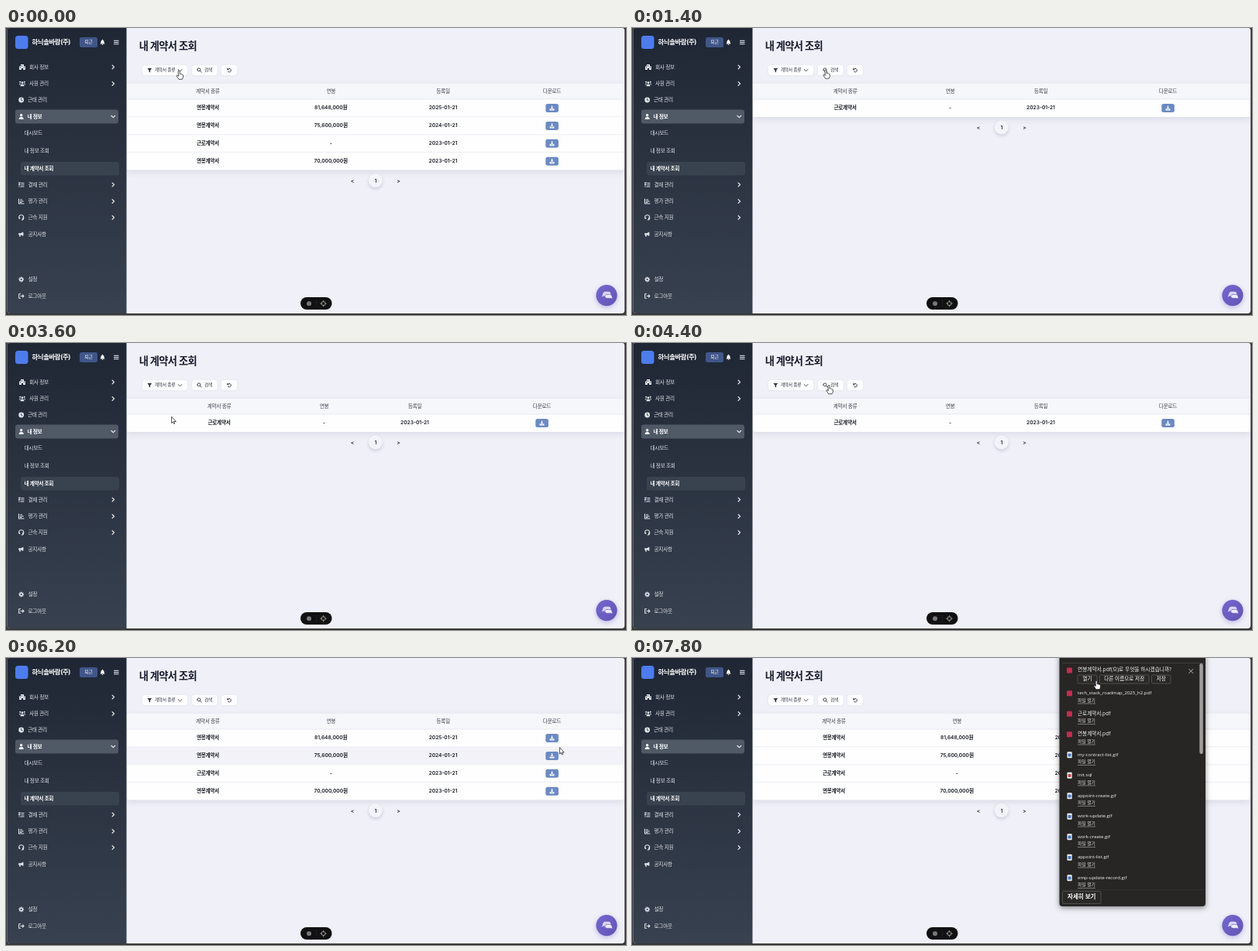
An HTML page with a canvas for the animation above (8 s loop, 800 px wide and 371 px high).

```html
<!DOCTYPE html>
<html lang="ko">
<head>
<meta charset="utf-8">
<title>내 계약서 조회</title>
<style>
html, body { margin: 0; width: 100%; height: 100%; overflow: hidden; background: #38383a; }
canvas { display: block; width: 800px; height: 371px; }
</style>
</head>
<body>
<canvas id="stage"></canvas>
<script>
const W = 800, H = 371, LOOP = 8000, STEP = 200;
const UI = "Inter, 'Noto Sans CJK KR', 'Noto Sans CJK', sans-serif";
const SYSTEM = "'Open Sans', 'Noto Sans CJK KR', 'Noto Sans CJK', sans-serif";
const canvas = document.getElementById('stage');
const dpr = window.devicePixelRatio || 1;
canvas.width = W * dpr;
canvas.height = H * dpr;
const ctx = canvas.getContext('2d');

function box(x, y, w, h, r, fill, stroke) {
  ctx.beginPath();
  ctx.roundRect(x, y, w, h, r);
  if (fill) { ctx.fillStyle = fill; ctx.fill(); }
  if (stroke) { ctx.strokeStyle = stroke; ctx.lineWidth = 0.7; ctx.stroke(); }
}

function disc(x, y, r, fill) {
  ctx.beginPath();
  ctx.arc(x, y, r, 0, Math.PI * 2);
  ctx.fillStyle = fill;
  ctx.fill();
}

function shadowed(blur, dy, color, draw) {
  ctx.save();
  ctx.shadowBlur = blur * dpr;
  ctx.shadowOffsetY = dy * dpr;
  ctx.shadowColor = color;
  draw();
  ctx.restore();
}

function text(s, x, y, { size = 6.7, weight = 500, color = '#222633', align = 'left', family = UI } = {}) {
  const tight = family === UI && /^[가-힣]/.test(s);
  ctx.font = `${weight} ${size}px ${family}`;
  ctx.letterSpacing = tight ? `${-0.045 * size}px` : '0px';
  ctx.textAlign = align;
  ctx.textBaseline = 'middle';
  ctx.fillStyle = color;
  ctx.fillText(s, x, y);
}

// Icons are centred on the given point.
function icon(d, x, y, { fill, stroke, width = 1, rule = 'evenodd' } = {}) {
  const path = new Path2D(d);
  ctx.save();
  ctx.translate(x, y);
  ctx.lineCap = ctx.lineJoin = 'round';
  if (fill) { ctx.fillStyle = fill; ctx.fill(path, rule); }
  if (stroke) { ctx.strokeStyle = stroke; ctx.lineWidth = width; ctx.stroke(path); }
  ctx.restore();
}

const ICON = {
  office: 'M-4-1H-2V-3.5H2V-1H4V3.5H1V1.5H-1V3.5H-4ZM-1-2.2V-1H0V-2.2ZM-3 .2V1.2H-2V.2ZM2 .2V1.2H3V.2Z',
  people: 'M-1.4-1.3a1.4 1.4 0 1 0 2.8 0a1.4 1.4 0 1 0-2.8 0ZM-3.8-2.3a1 1 0 1 0 2 0a1 1 0 1 0-2 0ZM1.8-2.3a1 1 0 1 0 2 0a1 1 0 1 0-2 0ZM-2.5 3.2Q-2.5 .6 0 .6T2.5 3.2ZM-4.2 1.2Q-4-.7-2-.6L-2.8 1.2ZM4.2 1.2Q4-.7 2-.6L2.8 1.2Z',
  clock: 'M-3.4 0a3.4 3.4 0 1 0 6.8 0a3.4 3.4 0 1 0-6.8 0ZM-.4-2.2H.4V-.2L1.7 .8L1.2 1.5L-.4 .3Z',
  person: 'M-1.7-1.8a1.7 1.7 0 1 0 3.4 0a1.7 1.7 0 1 0-3.4 0ZM-3 3.5Q-3 .5 0 .5T3 3.5Z',
  checks: 'M-3.3-2.3l.7.7l1.1-1.3M-3.3 0l.7.7l1.1-1.3M.2-2H3.3M.2.2H3.3M-3 2.5H-2.6M-.9 2.5H3.3',
  chart: 'M-3.2-3V3H3.3M-1.3-2H1M-1.3 0H2.6M-1.3 1.5H.2',
  headset: 'M-3 1V-.3a3 3 0 0 1 6 0V1M-2 .2V1.5M2 .2V1.5M3 1Q3 3 .5 3',
  horn: 'M-3.5-1.2H-.5L2.6-3V2.6L-.5 1H-1.2L-.7 3.3H-2.2L-2.7 1H-3.5ZM3-.9Q4-.2 3 .6Z',
  exit: 'M-1-2.7H-3V2.7H-1M-.8 0H3.2M1.6-1.7L3.3 0L1.6 1.7',
  bell: 'M-3 2Q-2 1-2-.8Q-2-2.8-.4-3.1V-3.8H.4V-3.1Q2-2.8 2-.8Q2 1 3 2ZM-.9 2.5H.9Q.6 3.6 0 3.6T-.9 2.5Z',
  menu: 'M-2.8-2.2H2.8M-2.8 0H2.8M-2.8 2.2H2.8',
  right: 'M-1.2-2.4L1.2 0L-1.2 2.4',
  down: 'M-2.4-1.2L0 1.2L2.4-1.2',
  funnel: 'M-2.9-2.6H2.9L.8 0V2.7L-.8 1.7V0Z',
  lens: 'M-2.6-.6a2 2 0 1 0 4 0a2 2 0 1 0-4 0M.9 1L2.7 2.8',
  reset: 'M-2.3-2.4V-.8H-.7M-2.1-.9A2.3 2.3 0 1 1-1.5 1.7',
  save: 'M-.6-3.1H.6V-.6H1.9L0 1.2L-1.9-.6H-.6ZM-3 1H-1.2L0 2L1.2 1H3V3H-3Z',
  aim: 'M-2.7 0a2.7 2.7 0 1 0 5.4 0a2.7 2.7 0 1 0-5.4 0M0-3.8V-1.8M0 3.8V1.8M-3.8 0H-1.8M3.8 0H1.8',
  close: 'M-2.7-2.7L2.7 2.7M2.7-2.7L-2.7 2.7',
  hand: 'M-1 0Q0-1 1 0V4Q2 3.4 2.6 4.2Q3.6 3.8 4 4.8Q5 4.5 5.2 5.6V8Q5 9.6 4 10.8H-.4Q-1.6 8.8-3 7Q-3.4 5.6-2.2 5.6L-1 6.6Z',
  arrow: 'M0 0V8L1.8 6.4L3 9L4.2 8.5L3 6H5.4Z'
};

const gear = Array.from({ length: 32 }, (_, i) => {
  const r = i % 4 < 2 ? 3.5 : 2.5, a = i * Math.PI / 16;
  return `${i ? 'L' : 'M'}${(r * Math.cos(a)).toFixed(2)} ${(r * Math.sin(a)).toFixed(2)}`;
}).join('') + 'ZM-1.1 0a1.1 1.1 0 1 0 2.2 0a1.1 1.1 0 1 0-2.2 0Z';

// label, y, text x, icon, line icon, chevron
const MENU = [
  ['회사 정보', 50.5, 30, ICON.office, false, 'right'],
  ['사원 관리', 72, 30, ICON.people, false, 'right'],
  ['근태 관리', 93, 28, ICON.clock],
  ['내 정보', 114.5, 27.5, ICON.person, false, 'down'],
  ['대시보드', 135.5, 23.5],
  ['내 정보 조회', 158.5, 23.5],
  ['내 계약서 조회', 181.5, 23.5],
  ['결재 관리', 202.5, 28.5, ICON.checks, true, 'right'],
  ['평가 관리', 224, 28.5, ICON.chart, true, 'right'],
  ['근속 지원', 245, 28.5, ICON.headset, true, 'right'],
  ['공지사항', 266.5, 28.5, ICON.horn],
  ['설정', 325, 28.5, gear],
  ['로그아웃', 346.5, 28.5, ICON.exit, true]
];

function drawSidebar() {
  const shade = ctx.createLinearGradient(0, 0, 0, 369);
  shade.addColorStop(0, '#1f2735');
  shade.addColorStop(1, '#38414f');
  box(1.5, 0, 154, 369, [3, 0, 0, 4], shade);
  box(12, 10, 16.5, 17, 3.5, '#4d7cec');
  text('하늬솔바람(주)', 33.5, 18.5, { size: 8.4, weight: 700, color: '#fff' });
  box(95, 12, 23, 13, 2.5, '#40568a');
  text('퇴근', 106.5, 18.5, { size: 6, color: '#eef1f8', align: 'center' });
  icon(ICON.bell, 124.5, 18.5, { fill: '#fff' });
  icon(ICON.menu, 142.3, 18.5, { stroke: '#f0f2f6' });

  box(12, 105.5, 133, 18, 3, '#505966');
  box(19, 173, 127, 17.5, 3, '#39424f');
  for (const [label, y, x, glyph, line, chevron] of MENU) {
    const strong = y === 114.5 || y === 181.5;
    const color = strong ? '#fff' : '#dfe3e9';
    if (glyph) icon(glyph, y < 80 ? 21 : 19.7, y, line ? { stroke: color, width: 1.1 } : { fill: color });
    text(label, x, y, { color, weight: strong ? 700 : 500 });
    if (chevron) icon(ICON[chevron], 138.3, y, { stroke: '#f0f2f5', width: 1.2 });
  }
}

function drawFilters() {
  const ink = '#33363f';
  shadowed(3, 0.5, 'rgba(60,60,100,.08)', () => {
    for (const [x, w] of [[176, 58], [240, 32.5], [278, 20]]) box(x, 48, w, 13, 3.5, '#fdfdff');
  });
  icon(ICON.funnel, 185.3, 54.7, { fill: ink });
  text('계약서 종류', 191.7, 54.6, { size: 5.8, color: ink });
  icon(ICON.down, 224.5, 54.7, { stroke: ink, width: 0.9 });
  icon(ICON.lens, 249.5, 54.5, { stroke: ink, width: 0.9 });
  text('검색', 256, 54.6, { size: 5.8, color: ink });
  icon(ICON.reset, 288, 54.7, { stroke: ink, width: 0.9 });
}

const HEADS = ['계약서 종류', '연봉', '등록일', '다운로드'];
const SALARY = '연봉계약서', LABOR = '근로계약서';
const CONTRACTS = [
  [SALARY, '81,648,000원', '2025-01-21'],
  [SALARY, '75,600,000원', '2024-01-21'],
  [LABOR, '-', '2023-01-21'],
  [SALARY, '70,000,000원', '2023-01-21']
];
const TOP = 92, ROW = 22.9;

function drawTable(rows, hover) {
  const cols = rows.length === 1 ? [275, 410.5, 527.5, 691.5] : [260.3, 419.3, 564, 704.5];
  const bottom = TOP + rows.length * ROW;
  shadowed(9, 3, 'rgba(70,70,110,.13)', () => box(155.5, 72, 642.5, bottom - 72, [0, 0, 3, 3], '#fefeff'));
  box(155.5, 72, 642.5, 20, 0, '#f6f7fb');
  HEADS.forEach((s, i) => text(s, cols[i], 82, { color: '#3c404b', align: 'center' }));
  rows.forEach((row, i) => {
    const y = TOP + i * ROW, mid = y + 11.5;
    if (i === hover) box(155.5, y, 642.5, ROW, 0, '#f2f2f8');
    box(155.5, y - 0.4, 642.5, 0.8, 0, '#e7e9f0');
    row.forEach((s, c) => text(s, cols[c], mid, { size: 6.6, weight: 600, color: '#171a22', align: 'center' }));
    box(cols[3] - 8.2, mid - 5.5, 16.6, 11, 2.5, '#6c8ac2');
    icon(ICON.save, cols[3], mid, { fill: '#fff' });
  });

  const y = bottom + 14;
  shadowed(4, 2, 'rgba(50,50,90,.2)', () => disc(476.8, y - 0.5, 9, '#f3f3fa'));
  [['<', 447], ['1', 476.8], ['>', 506.5]].forEach(([s, x]) =>
    text(s, x, y, { weight: 600, color: '#20242e', align: 'center' }));
}

function drawOverlays() {
  box(380, 348, 40.5, 16, 8, '#111113');
  disc(391, 356.3, 3, '#77787a');
  box(400, 352, 0.6, 8, 0, '#2b2b2d');
  icon(ICON.aim, 409.5, 356.2, { stroke: '#a5a59a', width: 0.8 });

  const violet = ctx.createLinearGradient(762, 333, 788, 359);
  violet.addColorStop(0, '#7267cf');
  violet.addColorStop(1, '#6553b4');
  shadowed(6, 2, 'rgba(90,75,180,.35)', () => disc(775, 345.6, 13.6, violet));
  icon('M-1.8-4.2H2.2Q5.2-4 5.2-1Q5 1.7 2 1.8L-4.5 1.6L-6.7 3L-5.6.4Q-5-4-1.8-4.2Z', 775.2, 345, { fill: '#d9d3f3' });
  icon('M0-1H4Q7-.4 6.8 2L7.4 4.5L4.8 3.8H0Q-2.6 3.3-2.5 1.4Q-2-.7 0-1Z', 775.2, 345.5, { fill: '#efecfb', stroke: '#6f61c4', width: 0.6 });
}

const PDF = '#c92a50', IMAGE = '#3e74c6', SQL = '#c9463f';
const FILES = [
  ['tech_stack_roadmap_2025_h2.pdf', PDF], ['근로계약서.pdf', PDF], ['연봉계약서.pdf', PDF],
  ['my-contract-list.gif', IMAGE], ['init.sql', SQL], ['appoint-create.gif', IMAGE],
  ['work-update.gif', IMAGE], ['work-create.gif', IMAGE], ['appoint-list.gif', IMAGE],
  ['emp-update-record.gif', IMAGE]
];

function fileMark(y, color) {
  if (color === PDF) return box(561, y - 3.5, 7, 7, 1, color);
  box(561.5, y - 4, 6.2, 8, 0.8, '#eef0f3');
  box(562.7, y - 1.8, 3.8, 4, 0.4, color);
}

function popupButton(label, x, y, w, h, style) {
  box(x, y, w, h, 1.5, '#292827', '#61605e');
  text(label, x + w / 2, y + h / 2, { color: '#fff', align: 'center', family: SYSTEM, ...style });
}

function drawPopup(full) {
  const bottom = full ? 321 : 48.5;
  shadowed(7, 2, 'rgba(0,0,0,.45)', () => box(551.5, -5, 188.5, bottom + 5, 4, '#272625'));
  box(555, 6, 182, 0.7, 0, '#4a4947');
  popupButton('자세히 보기', 555.5, full ? 301.5 : 13, 49.5, 16, { size: 7.5, weight: 700 });
  if (!full) return;

  const ask = { size: 6.7, weight: 400, color: '#f5f5f5', family: SYSTEM };
  fileMark(16, PDF);
  text('연봉계약서.pdf(으)로 무엇을 하시겠습니까?', 575, 15.7, ask);
  const small = { size: 6.6, weight: 400 };
  popupButton('열기', 575, 22, 25, 11, small);
  popupButton('다른 이름으로 저장', 603.5, 22, 63.5, 11, small);
  popupButton('저장', 670.5, 22, 24.5, 11, small);
  icon(ICON.close, 721.3, 17, { stroke: '#d5d5d5', width: 0.8 });
  FILES.forEach(([name, color], i) => {
    const y = 45.7 + i * 26.5;
    fileMark(y, color);
    text(name, 575, y, { ...ask, size: /^[a-z]/.test(name) ? 6.05 : 6.6 });
    text('파일 열기', 575, y + 9.3, { ...ask, size: 5.8, color: '#d8d8d8' });
    box(575, y + 13, 23, 0.6, 0, '#b0b0b0');
  });
  box(555, 299.4, 182, 0.5, 0, '#3b3a38');
  box(732.3, 7, 4.5, 117, 2.2, '#a09f9e');
}

// time, pointer tip x and y, shape
const TRACK = [
  [0, 223.3, 55.5, 'hand'], [200, 223.3, 55.5, 'hand'], [600, 212, 92, 'hand'],
  [1000, 250, 54.5, 'hand'], [2000, 250, 54.5, 'hand'], [2600, 218, 55, 'hand'],
  [3000, 217, 56, 'hand'], [3400, 213.6, 95.5, 'arrow'], [3800, 213.6, 95.5, 'arrow'],
  [4400, 254, 55, 'hand'], [4800, 254, 55, 'hand'], [5000, 290, 51.5, 'hand'],
  [5400, 290, 51.5, 'hand'], [5600, 330, 60, 'arrow'], [6200, 714.4, 116, 'arrow'],
  [6400, 706, 124, 'hand'], [6800, 706, 124, 'hand'], [7200, 630, 121, 'hand'],
  [7400, 627, 105, 'hand'], [7800, 599.2, 29.8, 'hand'], [8000, 599.2, 29.8, 'hand']
];

function pointerAt(t) {
  const i = TRACK.findIndex(k => k[0] > t);
  const [t0, x0, y0, shape] = TRACK[i - 1], [t1, x1, y1] = TRACK[i];
  const u = (t - t0) / (t1 - t0), e = u * u * (3 - 2 * u);
  return { x: x0 + (x1 - x0) * e, y: y0 + (y1 - y0) * e, shape };
}

function rowsAt(t) {
  if (t >= 1200 && t < 4600) return CONTRACTS.filter(r => r[0] === LABOR);
  if (t >= 4600 && t < 5400) return CONTRACTS.filter(r => r[0] === SALARY);
  return CONTRACTS;
}

function draw(t) {
  const pointer = pointerAt(t);
  const hover = t >= 5400 ? Math.floor((pointer.y - TOP) / ROW) : -1;
  ctx.setTransform(dpr, 0, 0, dpr, 0, 0);
  box(0, 0, W, H, 0, '#38383a');
  box(1.5, 0, 796.7, 369, [3, 3, 4, 4], '#f0f0f8');
  text('내 계약서 조회', 171.7, 24.3, { size: 13.2, weight: 700, color: '#161a2b' });
  drawFilters();
  drawTable(rowsAt(t), hover);
  drawSidebar();
  drawOverlays();
  if (t >= 7200) drawPopup(t >= 7400);
  icon(ICON[pointer.shape], pointer.x, pointer.y, { fill: '#fff', stroke: '#25262b', width: 0.8, rule: 'nonzero' });
}

function tick(now) {
  draw(Math.floor(now % LOOP / STEP) * STEP);
  requestAnimationFrame(tick);
}
tick(performance.now());
</script>
</body>
</html>
```
